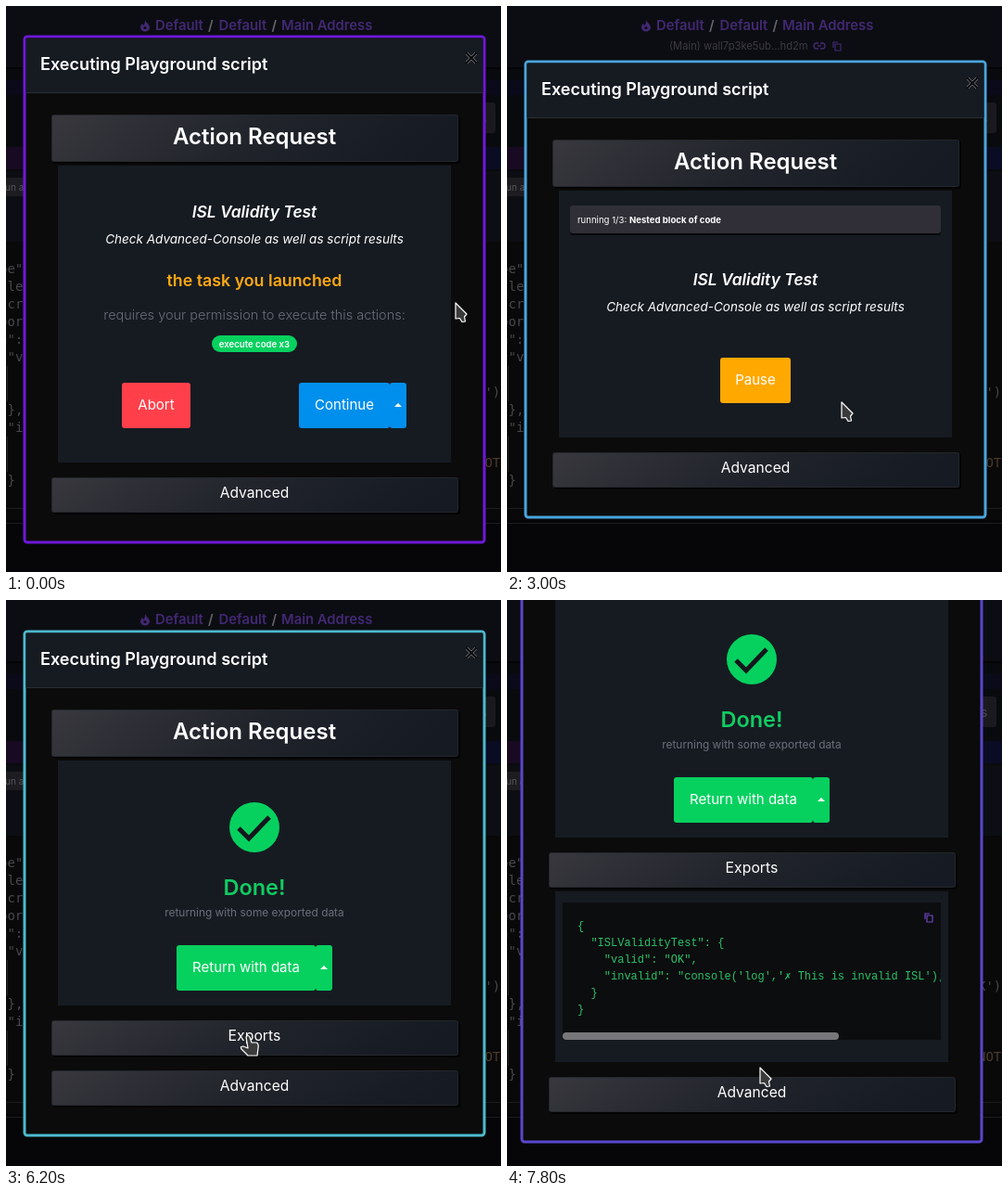
An HTML page that plays this animation: 534 by 610 pixels, repeating every 8 s.

```html
<!DOCTYPE html>
<html lang="en">
<head>
<meta charset="utf-8">
<title>Script dialog</title>
<style>
  html, body { margin: 0; width: 100%; height: 100%; overflow: hidden; background: #060608; }
  svg { display: block; width: 534px; height: 610px; font-family: Inter, "Open Sans", sans-serif; }
  text { white-space: pre; }
  .mono { font-family: "Liberation Mono", "DejaVu Sans Mono", monospace; }
  .editor { font-family: "DejaVu Sans Mono", monospace; }
</style>
</head>
<body>
<svg id="stage" viewBox="0 0 534 610"></svg>
<script>
const LOOP = 8000, STEP = 200;

const rect = (x, y, w, h, fill, extra = '') =>
  `<rect x="${x}" y="${y}" width="${w}" height="${h}" fill="${fill}" ${extra}/>`;

// y is the middle of the capital letters
const text = (str, x, y, size, fill, extra = '') =>
  `<text x="${x}" y="${(y + size * 0.36).toFixed(1)}" font-size="${size}" fill="${fill}" ${extra}>${str}</text>`;

const MID = 'text-anchor="middle"', BOLD = 'font-weight="600"', ITALIC = 'font-style="italic"';
const centred = (str, y, size, fill, extra = '', x = 268) => text(str, x, y, size, fill, `${MID} ${extra}`);

const bar = (label, y, h, size, extra = '') =>
  rect(51, y + 2, 439, h, '#030304', 'rx="3"') +
  rect(49.5, y + .5, 438, h - 1, 'url(#metal)', 'rx="2" stroke="#24272d"') +
  centred(label, y + (h > 40 ? 23 : 16), size, '#fff', extra);

const panel = (y, h) => rect(56, y, 424, h, '#161b22');
const advanced = y => bar('Advanced', y, 38, 15.6);
const button = (label, x, y, w, fill) =>
  rect(x, y, w, 49, fill, 'rx="3"') + centred(label, y + 24, 15, '#fff', '', x + w / 2);
const menuButton = (x, y, fill) =>
  rect(x, y, 18, 49, fill, 'rx="3"') + `<path d="M${x + 5} ${y + 26}h8l-4-4z" fill="#fff"/>`;
const copyIcon = (x, y, color) =>
  `<path d="M${x - 4} ${y + 2}v-6h5M${x - 2} ${y - 2}h6v7h-6z" fill="none" stroke="${color}" stroke-width="1.2"/>`;

const heading = y =>
  centred('ISL Validity Test', y, 17.4, '#fff', `${BOLD} ${ITALIC}`) +
  centred('Check Advanced-Console as well as script results', y + 29, 13.5, '#fff', ITALIC);

const request = panel(140, 320) + heading(190) +
  centred('the task you launched', 264, 17.8, '#ffa812', BOLD) +
  centred('requires your permission to execute this actions:', 301, 14.5, '#6a6e78', 'font-weight="300"') +
  rect(222, 323, 92, 18, '#06d15f', 'rx="9"') +
  centred('execute code x3', 332, 9.6, '#fff', BOLD) +
  button('Abort', 125, 374, 74, '#ff404b') +
  button('Continue', 316, 374, 98, '#008fec') + menuButton(414, 374, '#008fec') +
  advanced(476);

const running = panel(140, 266) +
  rect(68, 158, 400, 30, '#07080a', 'rx="3"') + rect(68, 156, 400, 30, '#302f37', 'rx="3"') +
  text('running 1/3: <tspan font-weight="700">Nested block of code</tspan>', 76, 171, 9.6, '#fff') +
  heading(236) + button('Pause', 230, 320, 76, '#ffa800') + advanced(422);

const done = panel(140, 264) +
  '<circle cx="268" cy="212" r="27" fill="#06d15f"/>' +
  '<path d="M251 213l11 11 22-23" fill="none" stroke="#12171d" stroke-width="5"/>' +
  centred('Done!', 276, 23.5, '#12cc62', BOLD) +
  centred('returning with some exported data', 304, 11.9, '#6b6f79') +
  button('Return with data', 184, 339, 150, '#06d15f') + menuButton(334, 339, '#06d15f') +
  bar('Exports', 420, 38, 15.8);

const exportLines = [
  '{',
  '  "ISLValidityTest": {',
  '    "valid": "OK",',
  `    "invalid": "console('log','✗ This is invalid ISL');`,
  '  }',
  '}'
];
const exported = panel(462, 184) + rect(64, 474, 408, 148, '#0c0d0f') +
  '<g class="mono" clip-path="url(#codeBox)">' +
  exportLines.map((line, i) => text(line, 80, 499 + 18 * i, 12, '#2bc268')).join('') + '</g>' +
  copyIcon(459, 490, '#6f45c4') + rect(64, 614, 298, 8, '#77777a', 'rx="4"') + advanced(662);

const STATES = [
  { from: 0, top: 32, height: 547, body: request },
  { from: 2200, top: 59, height: 493, body: running },
  { from: 4400, top: 33, height: 545, body: done + advanced(474) },
  { from: 6600, top: 26, height: 733, shift: -4, body: done + exported }
];

const editorLines = [[-7, 283, 'pe"'], [1.5, 302, 'le'], [1.5, 321, 'cr'], [-7, 340, 'por'], [-7, 359, 'n":'],
  [1.5, 378, '"v'], [1.5, 435, '},'], [1.5, 454, '"i'], [1.5, 511, '}'], [508, 416, "K')"]];
const PURPLE = '#422873';
const crumb = (str, x, fill = PURPLE) => text(str, x, 21, 14.8, fill, BOLD);

const backdrop = rect(0, 0, 534, 610, '#060608') +
  rect(0, 0, 534, 66, '#0c0d12') + rect(0, 66, 534, 188, '#090a0e') + rect(0, 66, 534, 2, '#040406') +
  rect(0, 80, 534, 16, '#0b0a1b') + rect(0, 152, 534, 24, 'url(#band)') +
  rect(0, 178, 534, 76, '#0c0e13') + rect(0, 254, 534, 300, '#09090a') +
  rect(0, 541, 534, 1, '#1d1d20') + rect(0, 557, 534, 1, '#1d1d20') +
  rect(470, 104, 58, 33, '#1a1a1e', 'rx="3"') + text('s', 511, 121, 14, '#4b4b50') +
  rect(-20, 185, 70, 20, '#1d1d21', 'rx="3"') + text('un a', -1, 195, 10, '#55555a') +
  '<g class="editor">' + editorLines.map(([x, y, s]) => text(s, x, y, 14, '#48484c')).join('') +
  text('NOT', 508, 492, 14, '#4b3b2a') + '</g>' +
  rect(1, 388, 1, 38, '#242427') + rect(1, 464, 1, 38, '#242427') +
  `<path d="M150 15c1 3 5 5 5 8a5 4.5 0 0 1-10 0c0-2 1-3 2-4l1 2c2-1 2-4 2-6z" fill="${PURPLE}"/>` +
  '<circle cx="150" cy="23.5" r="1.6" fill="#0c0d12"/>' +
  crumb('Default', 161) + crumb('/', 218, '#66666b') + crumb('Default', 229.5) +
  crumb('/', 286.5, '#66666b') + crumb('Main Address', 297) +
  text('(Main) wall7p3ke5ub...hd2m', 175, 43, 11.2, '#3b3b41') +
  `<path d="M336 40h-2a3 3 0 0 0 0 6h2M338 40h2a3 3 0 0 1 0 6h-2M335 43h4" fill="none" stroke="${PURPLE}" stroke-width="1.4"/>` +
  copyIcon(356, 43, PURPLE);

const chrome = '<rect id="frame" x="20" y="1" width="496" fill="#0b0b0b" stroke-width="3" rx="3"/>' +
  rect(21.5, 2.5, 493, 58.5, '#161a21') + rect(21.5, 61, 493, 1, '#2a2d33') +
  text('Executing Playground script', 37, 30, 18.1, '#fff', BOLD) +
  '<path d="M497 19l10 10M507 19l-10 10" stroke="#77777b" stroke-width="3.4"/>' +
  '<path d="M496.5 18.5l11 11M507.5 18.5l-11 11" stroke="#08090b" stroke-width="2"/>' +
  bar('Action Request', 85, 51, 24, BOLD);

const stage = document.getElementById('stage');
stage.innerHTML = `<defs>
  <linearGradient id="metal" x1="0" y1="0" x2="1" y2=".12">
    <stop offset="0" stop-color="#38383e"/><stop offset=".55" stop-color="#20232a"/><stop offset="1" stop-color="#151a23"/>
  </linearGradient>
  <linearGradient id="band"><stop stop-color="#180a22"/><stop offset="1" stop-color="#0a0c24"/></linearGradient>
  <clipPath id="codeBox"><rect x="64" y="474" width="408" height="148"/></clipPath>
</defs>${backdrop}
<g id="modal">${chrome}${STATES.map(s => `<g class="state">${s.body}</g>`).join('')}</g>
<g id="cursor" fill="#3b3b3b" stroke="#fff" stroke-width="1.2" stroke-linejoin="round">
  <path id="arrow" d="M0 0V17L4.5 16.5 7 20.5 10.5 20 9.5 15 12 12Z"/>
  <path id="hand" d="M-2 1Q0-2 2 1L4 7 9 7Q12 8 11 13L10 21H0L-7 14Q-9 11-5 11L0 13Z"/>
</g>`;

const [frame, modal, cursor, arrow, hand] =
  ['frame', 'modal', 'cursor', 'arrow', 'hand'].map(id => document.getElementById(id));
const groups = [...stage.querySelectorAll('.state')];

const BORDER = [[0, 110, 24, 218], [1400, 94, 92, 222], [3000, 74, 165, 222], [5000, 50, 236, 196],
  [6200, 76, 186, 206], [7000, 88, 106, 214], [7800, 90, 70, 204]];
const POINTER = [[0, 485, 320], [600, 485, 320], [1400, 371, 396], [1600, 361, 427], [4200, 361, 427],
  [4800, 344, 431], [5200, 344, 431], [5800, 261, 470], [6400, 261, 470], [6800, 262, 452],
  [7400, 262, 452], [7800, 273, 504]];

// The mouse wheel scrolls in notches until the dialog's bottom margin is reached
const NOTCH = 58, SCROLL_START = 7000;
const scrollAt = t => NOTCH * Math.min(3, 2 * Math.max(0, t - SCROLL_START) / STEP);

function track(keys, t) {
  const next = keys.findIndex(k => k[0] > t);
  if (next < 0) return keys[keys.length - 1].slice(1);
  const a = keys[next - 1], b = keys[next], p = (t - a[0]) / (b[0] - a[0]);
  return a.slice(1).map((v, i) => v + (b[i + 1] - v) * p);
}

function draw(now) {
  const t = Math.floor(now % LOOP / STEP) * STEP;
  const index = STATES.filter(s => s.from <= t).length - 1;
  const { top, height, shift = 0 } = STATES[index];

  groups.forEach((g, i) => g.setAttribute('display', i === index ? 'inline' : 'none'));
  modal.setAttribute('transform', `translate(${shift} ${top - scrollAt(t)})`);
  frame.setAttribute('height', height - 2);
  frame.setAttribute('stroke', `rgb(${track(BORDER, t).map(Math.round)})`);

  const pointing = (t >= 1600 && t < 2200) || (t >= 5800 && t < 7200);
  cursor.setAttribute('transform', `translate(${track(POINTER, t).map(Math.round)})`);
  arrow.setAttribute('display', pointing ? 'none' : 'inline');
  hand.setAttribute('display', pointing ? 'inline' : 'none');
}

const start = performance.now();
function tick() {
  draw(performance.now() - start);
  requestAnimationFrame(tick);
}
tick();
</script>
</body>
</html>
```
